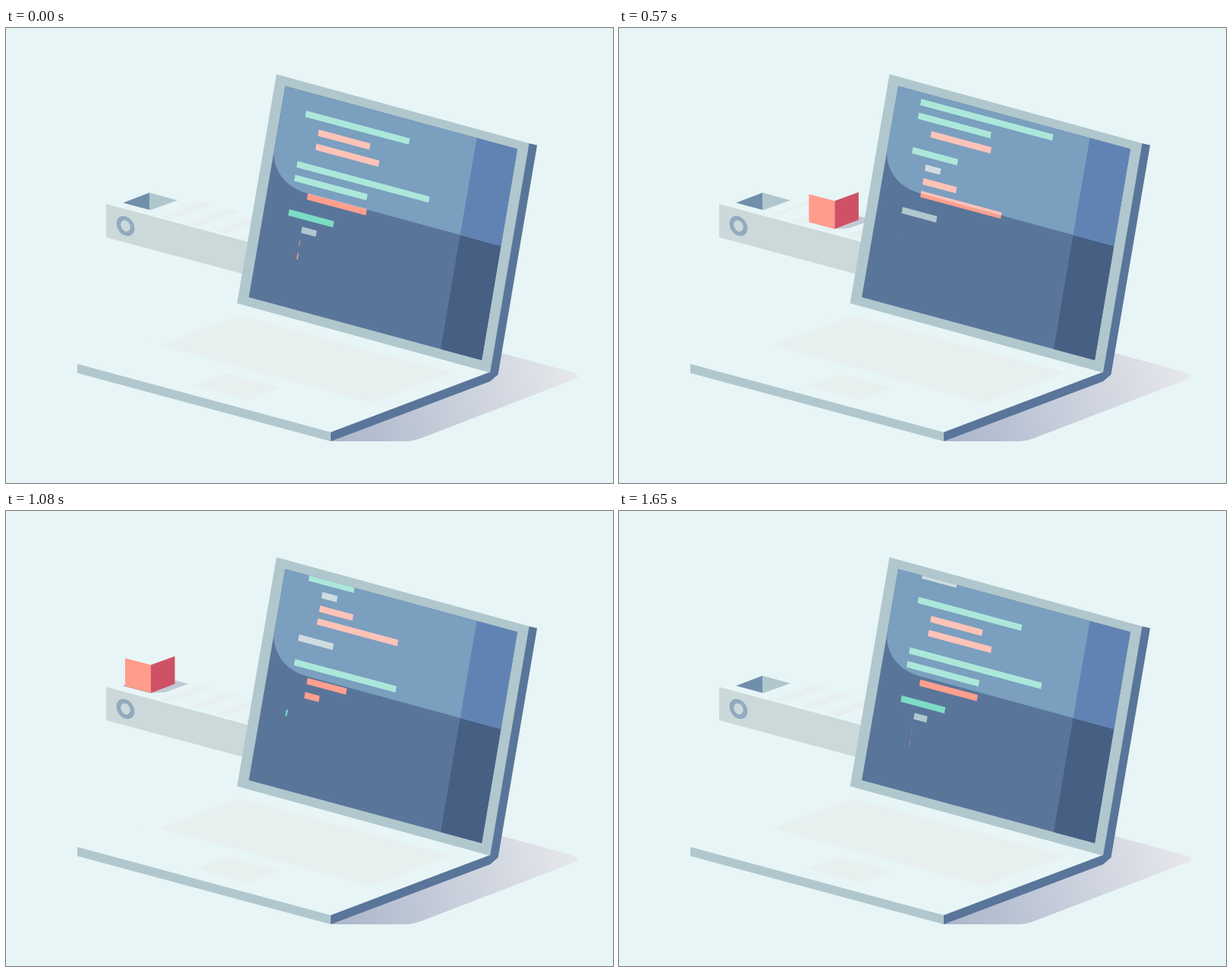
Animation of 800 by 600 pixels, one loop 1680 ms. Source, as an HTML page with a canvas:

```html
<!DOCTYPE html>
<html lang="en">
<head>
<meta charset="utf-8">
<title>Code conveyor</title>
<style>
  html, body { margin: 0; width: 100%; height: 100%; overflow: hidden; background: #e8f5f6; }
  canvas { display: block; width: 800px; height: 600px; }
</style>
</head>
<body>
<canvas id="stage" width="800" height="600"></canvas>
<script>
const ctx = document.getElementById('stage').getContext('2d');
const LOOP = 1680, STEP = 30;
const SLOPE = 0.268;            // fall of the long edges
const SCROLL = 241.4 / LOOP;    // code scroll, px per ms
const BELT = 177, PITCH = BELT / 5;
const BG = '#e8f5f6', PALE = '#e7efef', STEEL = '#b0c7cd', NAVY = '#5a759a';

const clamp = x => Math.min(1, Math.max(0, x));
const smooth = x => x * x * (3 - 2 * x);
const cubic = x => x < 0.5 ? 4 * x ** 3 : 1 - 4 * (1 - x) ** 3;

const COLORS = {            // in the dark area, under the glare
  green: ['#7cdcc4', '#ace8da'],
  pink: ['#ff9f8d', '#ffc3b8'],
  gray: ['#b0c7cd', '#d0dde0']
};

// color, indent, row offset, width, start and duration of growth
const LINES = [
  ['green', 0, 0, 136.5, -1134, 644],
  ['pink', 20, 19.6, 68, -975, 615],
  ['pink', 20, 38.1, 83, -852, 652],
  ['green', 0, 66.5, 174, -685, 590],
  ['green', 0, 84.5, 95.5, -553, 600],
  ['pink', 20, 103.6, 79, -422, 500],
  ['green', 0, 130, 59.5, -392, 450],
  ['gray', 20, 147.6, 20, -183, 230],
  ['pink', 20, 165.6, 44, -100, 620],
  ['pink', 20, 182.4, 106, -90, 590],
  ['gray', 0, 209, 45.5, 10, 600]
];

function shape(...points) {
  const path = new Path2D();
  for (let i = 0; i < points.length; i += 2) path.lineTo(points[i], points[i + 1]);
  path.closePath();
  return path;
}

function fill(path, color) {
  ctx.fillStyle = color;
  ctx.fill(path);
}

function clipped(path, draw) {
  ctx.save();
  if (path) ctx.clip(path);
  draw();
  ctx.restore();
}

const screen = shape(368, 76.5, 674, 159.5, 627, 438, 320, 355);
const glare = new Path2D('M368 76.5L674 159.5L652.3 287.5L395 217.5C367 209 352 187 353.2 162Z');
const floorShadow = new Path2D('M640 425L745 453.5Q763 459 746 464.5L548 540.5Q536 545 526 545H428Z');
const hole = shape(154.5, 230.5, 189.5, 217.3, 226, 227.3, 190.5, 240);
const holeShaft = shape(154.5, 150, 154.5, 230.5, 190.5, 240, 226, 227.3, 226, 150);
const beltArea = shape(252, 226.9, 400, 266.5, 346, 286.5, 198, 246.9);

const floorTint = ctx.createLinearGradient(445, 545, 755, 455);
floorTint.addColorStop(0, '#adb8cc');
floorTint.addColorStop(1, '#e7e8ec');

function drawBase() {
  fill(floorShadow, floorTint);
  fill(shape(94, 443, 305, 363, 638, 454, 428, 533), BG);
  fill(shape(94, 443, 428, 533, 428, 545, 94, 455), STEEL);
  fill(shape(308, 379, 588, 454.5, 481, 494.5, 203, 418.5), PALE);
  fill(shape(291, 456, 361, 474.5, 320, 491, 248, 471.5), PALE);
}

function drawBelt(left) {
  fill(shape(132, 232, 340, 287.7, 340, 331.7, 132, 276), '#ccd9da');
  ctx.save();
  ctx.transform(1, SLOPE, 0, 1, 157.5, 261);
  ctx.beginPath();
  ctx.ellipse(0, 0, 9.1, 10, 0, 0, 7);
  ctx.lineWidth = 5.6;
  ctx.strokeStyle = '#92aabf';
  ctx.stroke();
  ctx.restore();

  clipped(beltArea, () => {
    for (let i = -1; i < 4; i++) {
      const dx = left % PITCH + i * PITCH;
      ctx.save();
      ctx.translate(dx, dx * SLOPE);
      fill(shape(258, 228.5, 272.5, 232.4, 218.5, 252.4, 204, 248.5), PALE);
      ctx.restore();
    }
  });
}

function drawBox(left, drop) {
  fill(hole, STEEL);
  fill(shape(154.5, 230.5, 189, 217.3, 189, 239.7), '#6f8fab');
  clipped(drop ? holeShaft : null, () => {
    ctx.translate(left, left * SLOPE + drop);
    fill(shape(157, 194, 191, 203, 222.5, 191.5, 188.5, 182.5), BG);
    fill(shape(157, 194, 191, 203, 191, 240, 157, 231), '#ff9c8b');
    fill(shape(191, 203, 222.5, 191.5, 222.5, 228, 191, 240), '#cf5165');
  });
}

function drawBoxShadow(left, drop) {
  const reach = clamp(1 - drop / 37);
  ctx.save();
  ctx.translate(left, left * SLOPE);
  fill(shape(191, 240, 222, 228, 222, 228 - 5 * reach, 222 + 18.5 * reach, 228,
    191 + 19 * reach, 240 - reach), '#c4c9d5');
  ctx.restore();
}

function drawLines(t, tone) {
  ctx.transform(1, SLOPE, -0.172, 1, 395.7, 109);
  for (const [color, indent, row, width, start, span] of LINES) {
    ctx.fillStyle = COLORS[color][tone];
    for (const time of [t, t - LOOP]) {
      const grown = width * cubic(clamp((time - start) / span));
      if (grown) ctx.fillRect(indent, row - SCROLL * time, grown, 8.2);
    }
  }
}

function drawScreen(t) {
  fill(shape(689, 152, 700, 154.5, 648.5, 457, 638, 466, 428, 545, 428, 533, 637, 454), NAVY);
  fill(shape(356.5, 61, 689.5, 152, 638, 454.5, 304.5, 363), STEEL);
  fill(screen, NAVY);
  fill(shape(598.5, 273, 652.3, 287.5, 627, 438, 573, 423.5), '#465f83');
  clipped(screen, () => drawLines(t, 0));
  fill(glare, '#7b9fbf');
  fill(shape(620.5, 145, 674, 159.5, 652.3, 287.5, 598.5, 273), '#6183b4');
  clipped(glare, () => drawLines(t, 1));
}

function draw(t) {
  const left = BELT * (1 - smooth(clamp((t - 133) / 907)));
  const drop = 42.5 * (Math.max(0, t - 1080) / 210) ** 2;
  fill(shape(0, 0, 800, 0, 800, 600, 0, 600), BG);
  drawBase();
  drawBelt(left);
  drawBoxShadow(left, drop);
  drawBox(left, drop);
  drawScreen(t);
}

const began = performance.now();
function tick() {
  const t = (performance.now() - began) % LOOP;
  draw(Math.floor(t / STEP) * STEP);
  requestAnimationFrame(tick);
}
tick();
</script>
</body>
</html>
```
